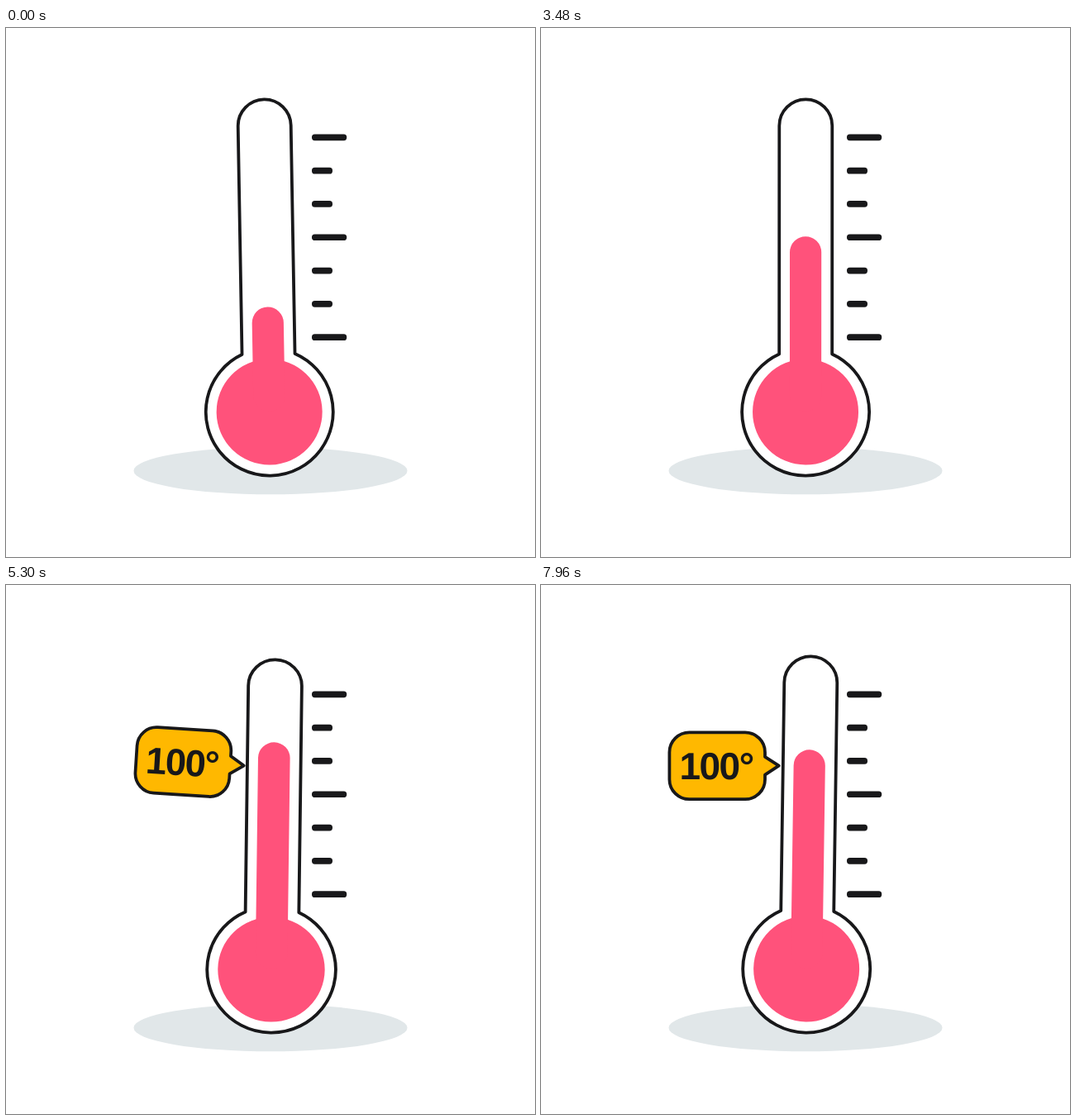
These frames come from a looping animation (640x640 px, 8 s). An HTML page:

```html
<!DOCTYPE html>
<html lang="en">
<head>
<meta charset="utf-8">
<title>Thermometer</title>
<style>
  html, body { margin: 0; width: 100%; height: 100%; overflow: hidden; background: #fff; }
  svg { display: block; width: 100%; height: 100%; }
  .line { stroke: #18181a; stroke-width: 3.8; stroke-linejoin: round; }
  .ink { fill: #18181a; }
  .fluid { fill: #ff527b; }
  text { font: bold 46px "Liberation Sans", Arial, sans-serif; letter-spacing: -1.5px; text-rendering: geometricPrecision; }
</style>
</head>
<body>
<svg viewBox="0 0 640 640">
  <ellipse cx="320" cy="535.7" rx="165.5" ry="28.6" fill="#e1e7e9"/>
  <g id="ticks" class="ink"></g>
  <g id="thermometer">
    <path class="line" fill="#fff" d="M288.1 394.5V118.3a32 32 0 0 1 64 0V394.5A77 77 0 1 1 288.1 394.5Z"/>
    <circle class="fluid" cx="320" cy="464.5" r="64"/>
    <rect id="stem" class="fluid" x="300.9" width="38.2" rx="19.1"/>
  </g>
  <g id="bubble">
    <path class="line" fill="#ffb800" d="M179.4 178.4H247a24 24 0 0 1 24 24V207.8L287.7 218.6L271 229.6V235.2a24 24 0 0 1 -24 24H179.4a24 24 0 0 1 -24 -24V202.4a24 24 0 0 1 24 -24Z"/>
    <text class="ink" x="167.4" y="235.3">100°</text>
  </g>
</svg>
<script>
const LOOP = 8000;
const byId = id => document.getElementById(id);
const thermometer = byId('thermometer'), stem = byId('stem'), bubble = byId('bubble');

for (let i = 0; i < 7; i++) {
  byId('ticks').innerHTML +=
    `<rect x="370" y="${128.5 + 40.3 * i}" width="${i % 3 ? 25 : 42.2}" height="7.7" rx="3.6"/>`;
}

const clamp = x => Math.min(1, Math.max(0, x));
const smooth = x => x * x * (3 - 2 * x);

// Smooth interpolation between [step, value] keys
function track(step, keys) {
  let value = keys[0][1];
  for (let i = 1; i < keys.length; i++) {
    const [from, a] = keys[i - 1], [to, b] = keys[i];
    if (step > from) value = a + (b - a) * smooth(clamp((step - from) / (to - from)));
  }
  return value;
}

// Cubic Bézier easing (1/3, 0, 5/6, 1), solved by bisection
function riseEase(x) {
  let low = 0, high = 1;
  for (let i = 0; i < 20; i++) {
    const s = (low + high) / 2, r = 1 - s;
    if (s * r * r + 2.5 * s * s * r + s ** 3 < x) low = s; else high = s;
  }
  return smooth(low);
}

// Five unevenly held steps in every 560 ms
function stepAt(ms) {
  const shifted = ms + 300, cycle = Math.floor(shifted / 560), rest = shifted % 560;
  const within = [40, 180, 300, 420].filter(start => rest >= start).length;
  return Math.max(0, 5 * (cycle - 1) + within + 1.5);
}

function pose(x, y, angle, sx, sy) {
  return `translate(${x} ${y}) rotate(${angle}) scale(${sx} ${sy}) translate(${-x} ${-y})`;
}

function draw(ms) {
  const step = stepAt(ms);
  const tilt = track(step, [[0, -1], [60, 1], [120, -1]]);
  const stretch = track(step, [[34, 0], [41.5, .0097], [46.5, -.009], [53, 0]]);
  thermometer.setAttribute('transform', pose(320.1, 541.7, tilt, 1 - 1.2 * stretch, 1 + stretch));

  const level = 337.5 - 151.5 * riseEase(clamp((step - 9.6) / 34.3))
    + track(step, [[44, 0], [58, 13.3]]);
  stem.setAttribute('y', level);
  stem.setAttribute('height', 464 - level);

  const size = track(step, [[33.3, 0], [47.5, 1]]);
  const turn = track(step, [[33.3, -55.5], [47.5, 4.5], [52, 0]]);
  bubble.setAttribute('transform', pose(288, 218.5, turn, size, size));
}

function tick() {
  draw(performance.now() % LOOP);
  requestAnimationFrame(tick);
}
tick();
</script>
</body>
</html>
```
